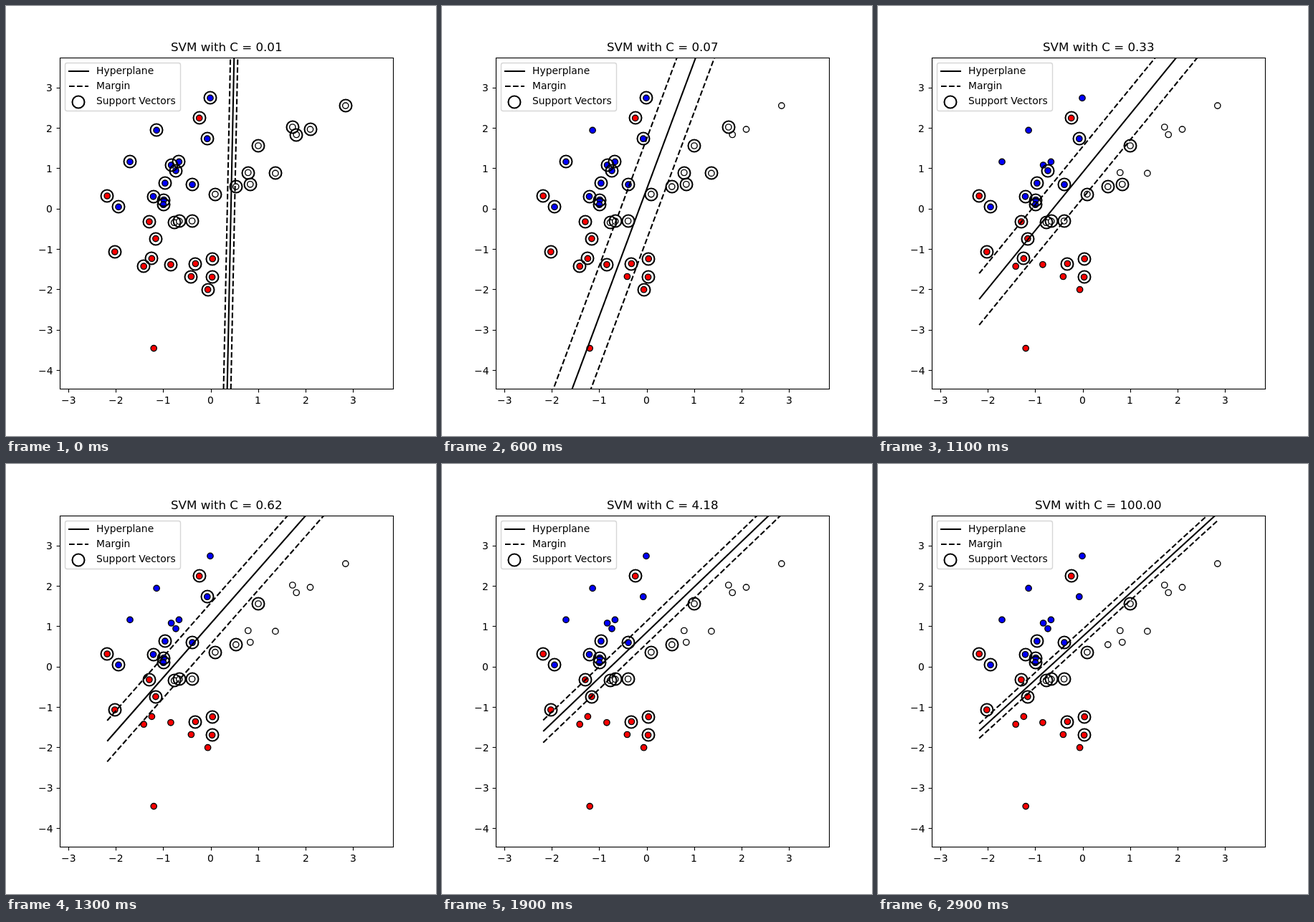
Animation of 600x600 px, one loop 3 s. Source, as an HTML page with a canvas:

```html
<!DOCTYPE html>
<html lang="en">
<head>
<meta charset="utf-8">
<title>SVM margin for growing C</title>
<style>
html, body { margin: 0; width: 100%; height: 100%; overflow: hidden; background: #fff; }
canvas { display: block; }
</style>
</head>
<body>
<canvas id="stage" width="600" height="600"></canvas>
<script>
const ctx = document.getElementById('stage').getContext('2d');
const STEPS = 30, STEP_MS = 100;
const PT = 100 / 72;
const LINE = 1.5 * PT, THIN = 0.8 * PT;
const AXES = { left: 75, top: 72, right: 540, bottom: 534 };
const SCALE_X = 66.24, SCALE_Y = 56.36, ORIGIN_X = 285.65, ORIGIN_Y = 282.7;
const DASH = [3.7 * LINE, 1.6 * LINE];
const FONT = '"DejaVu Sans", sans-serif';

const toX = x => ORIGIN_X + x * SCALE_X;
const toY = y => ORIGIN_Y - y * SCALE_Y;
const costAt = step => 10 ** (-2 + 4 * step / (STEPS - 1));

// The training samples, by class; everything that moves is computed from them.
const SAMPLES = {
  '#00f': [[210.1, 173.4], [173, 217.4], [285, 128.4], [230.6, 222], [241.4, 217.4],
    [280.8, 185.2], [237, 229.8], [221.9, 247.2], [260, 249.2], [205.5, 265.8],
    [220.2, 270.5], [219.6, 277.2], [157, 280.4]],
  '#fff': [[473.8, 139.1], [405.2, 179.5], [424.5, 172.1], [375.9, 233.4], [399.8, 169],
    [337.8, 232.5], [340.8, 248.8], [320.8, 252.1], [352, 195], [291.9, 262.6],
    [259.6, 300], [234.6, 302.2], [241.8, 300.4]],
  '#f00': [[206.2, 477.6], [192.2, 363.2], [229.9, 360.8], [258.4, 377.5], [203.4, 352.4],
    [281.6, 395.7], [269.7, 156.4], [141.2, 265], [199.9, 301], [208.9, 324.6],
    [151.8, 343], [264.4, 359.5], [288.2, 352.7], [287.6, 378.3]]
};

const points = Object.entries(SAMPLES).flatMap(([color, list]) => list.map(([px, py]) => ({
  px, py, color,
  x: (px - ORIGIN_X) / SCALE_X,
  y: (ORIGIN_Y - py) / SCALE_Y
})));
const minX = Math.min(...points.map(p => p.x));
const maxX = Math.max(...points.map(p => p.x));

const dot = (p, q) => p.x * q.x + p.y * q.y;

// Sequential minimal optimisation for a linear two-class SVM.
function trainPair(first, second, cost) {
  const data = points.filter(p => p.color === first || p.color === second);
  const sign = data.map(p => p.color === first ? 1 : -1);
  const alpha = data.map(() => 0);
  const grad = data.map(() => -1);
  const roomUp = t => sign[t] > 0 ? cost - alpha[t] : alpha[t];
  const roomDown = t => sign[t] > 0 ? alpha[t] : cost - alpha[t];
  const move = (t, delta) => {
    const a = alpha[t] + sign[t] * delta;
    alpha[t] = a < 1e-12 * cost ? 0 : cost - a < 1e-12 * cost ? cost : a;
  };

  for (let round = 0; round < 50000; round++) {
    let i = -1, j = -1, top = -Infinity, worst = 0, best = 0, quad = 1, gap = 0;
    data.forEach((_, t) => {
      if (roomUp(t) > 0 && -sign[t] * grad[t] > top) { top = -sign[t] * grad[t]; i = t; }
    });
    if (i < 0) break;
    data.forEach((p, t) => {
      if (roomDown(t) <= 0) return;
      const g = top + sign[t] * grad[t];
      worst = Math.max(worst, g);
      if (g <= 0) return;
      const q = Math.max(dot(data[i], data[i]) + dot(p, p) - 2 * dot(data[i], p), 1e-12);
      if (g * g / q > best) { best = g * g / q; j = t; quad = q; gap = g; }
    });
    if (worst < 1e-3 || j < 0) break;
    const delta = Math.min(gap / quad, roomUp(i), roomDown(j));
    move(i, delta);
    move(j, -delta);
    data.forEach((p, t) => {
      grad[t] += sign[t] * delta * (dot(p, data[i]) - dot(p, data[j]));
    });
  }

  let upper = Infinity, lower = -Infinity, sum = 0, free = 0, wx = 0, wy = 0;
  data.forEach((p, t) => {
    const value = sign[t] * grad[t];
    wx += alpha[t] * sign[t] * p.x;
    wy += alpha[t] * sign[t] * p.y;
    if (alpha[t] > 0 && alpha[t] < cost) { sum += value; free++; }
    else if ((alpha[t] === 0) === (sign[t] > 0)) upper = Math.min(upper, value);
    else lower = Math.max(lower, value);
  });
  const rho = free ? sum / free : (upper + lower) / 2;
  return {
    support: data.filter((_, t) => alpha[t] > 0),
    slope: -wx / wy,
    offset: rho / wy,
    margin: 1 / Math.hypot(wx, wy)
  };
}

// One classifier per pair of classes; the first pair gives the plotted line.
function buildModel(step) {
  const cost = costAt(step);
  const [a, b, c] = Object.keys(SAMPLES);
  const pairs = [[a, b], [a, c], [b, c]].map(([p, q]) => trainPair(p, q, cost));
  return {
    ...pairs[0],
    support: new Set(pairs.flatMap(pair => pair.support)),
    title: `SVM with C = ${cost.toFixed(2)}`
  };
}

const models = Array.from({ length: STEPS }, (_, step) => buildModel(step));

// Places text so that its ink starts on a whole pixel; align is 0, 0.5 or 1.
function text(str, x, y, size, align) {
  ctx.font = `${size * PT}px ${FONT}`;
  ctx.fillStyle = '#000';
  const { width, actualBoundingBoxLeft } = ctx.measureText(str);
  const bearing = -actualBoundingBoxLeft;
  const start = Math.round(x - align * width + bearing) - Math.floor(bearing);
  ctx.fillText(str, start, Math.round(y));
}

function segment(x1, y1, x2, y2, width, dash = []) {
  ctx.lineWidth = width;
  ctx.setLineDash(dash);
  ctx.beginPath();
  ctx.moveTo(x1, y1);
  ctx.lineTo(x2, y2);
  ctx.stroke();
  ctx.setLineDash([]);
}

function circle(x, y, radius, width, fill) {
  ctx.beginPath();
  ctx.arc(x, y, radius, 0, 2 * Math.PI);
  if (fill) { ctx.fillStyle = fill; ctx.fill(); }
  ctx.lineWidth = width;
  ctx.stroke();
}

const ring = (x, y) =>
  circle(Math.round(x), Math.round(y), Math.sqrt(150) * PT / 2, LINE);

// The line is cut at the stage edge first, which fixes the dash phase.
function plotLine({ slope, offset }, shift, dash) {
  const atEdge = py => ((ORIGIN_Y - py) / SCALE_Y - offset - shift) / slope;
  const [low, high] = [atEdge(601), atEdge(-1)].sort((a, b) => a - b);
  const x1 = Math.max(minX, low), x2 = Math.min(maxX, high);
  const y = x => toY(slope * x + offset + shift);
  segment(toX(x1), y(x1), toX(x2), y(x2), LINE, dash);
}

function drawAxes() {
  const crisp = v => Math.round(v) + 0.5;
  const name = n => String(n).replace('-', '\u2212');
  const { left, top, right, bottom } = AXES;
  ctx.lineWidth = THIN;
  ctx.strokeRect(left + 0.5, top + 0.5, right - left, bottom - top);
  for (let n = -4; n <= 3; n++) {
    const x = crisp(toX(n)), y = crisp(toY(n));
    segment(left + 0.5, y, left - 4.4, y, THIN);
    text(name(n), left - 7 * PT, toY(n) + 5.6, 10, 1);
    if (x < left) continue;
    segment(x, bottom + 0.5, x, bottom + 5.4, THIN);
    text(name(n), toX(n), 555, 10, 0.5);
  }
}

function drawLegend() {
  ctx.beginPath();
  ctx.roundRect(82.5, 79.5, 161, 67, 2 * PT);
  ctx.fillStyle = 'rgba(255,255,255,0.8)';
  ctx.fill();
  ctx.strokeStyle = 'rgba(204,204,204,0.8)';
  ctx.lineWidth = PT;
  ctx.stroke();
  ctx.strokeStyle = '#000';
  segment(87, 91, 116, 91, LINE);
  segment(88, 112, 115, 112, LINE, DASH);
  ring(101.4, 133.7);
  ['Hyperplane', 'Margin', 'Support Vectors'].forEach((label, row) =>
    text(label, 126.4, 95 + 21 * row, 10, 0));
}

function draw(model) {
  ctx.fillStyle = '#fff';
  ctx.fillRect(0, 0, 600, 600);
  ctx.strokeStyle = '#000';

  ctx.save();
  ctx.beginPath();
  ctx.rect(AXES.left, AXES.top, AXES.right - AXES.left, AXES.bottom - AXES.top);
  ctx.clip();
  points.forEach(p => circle(p.px, p.py, 3 * PT, PT, p.color));
  model.support.forEach(p => ring(p.px, p.py));
  plotLine(model, 0);
  plotLine(model, -model.margin, DASH);
  plotLine(model, model.margin, DASH);
  ctx.restore();

  drawAxes();
  drawLegend();
  text(model.title, (AXES.left + AXES.right) / 2, 63, 12, 0.5);
}

function tick() {
  draw(models[Math.floor(performance.now() / STEP_MS) % STEPS]);
  requestAnimationFrame(tick);
}
tick();
</script>
</body>
</html>
```
